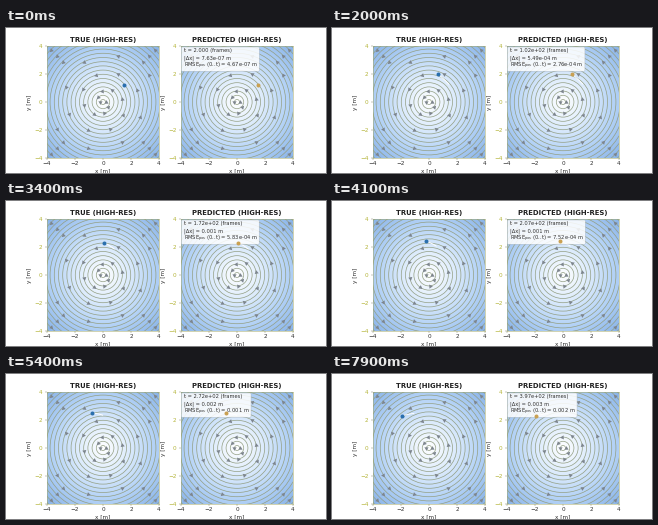
A matplotlib script for the animation above (8 s loop, 320x145 px).

```python
import numpy as np
import matplotlib.pyplot as plt
from matplotlib.animation import FuncAnimation
from matplotlib.colors import LinearSegmentedColormap
from matplotlib.patches import Circle, FancyBboxPatch

WIDTH, HEIGHT, DPI = 320, 145, 100
FRAMES, INTERVAL = 80, 100
PT = 72 / DPI  # points per pixel
PANEL, TOP, GAP = 112, 18, 134
LEFT = 41
RING_STEP = 0.3
GOLDEN_ANGLE = np.pi * (3 - np.sqrt(5))

plt.rcParams["font.family"] = "DejaVu Sans"
plt.rcParams["mathtext.fontset"] = "dejavusans"

fig = plt.figure(figsize=(WIDTH / DPI, HEIGHT / DPI), dpi=DPI, facecolor="white")
speed_map = LinearSegmentedColormap.from_list(
    "speed", ["#ffffff", "#dcebfc", "#b2d1f6", "#8ab4e9"])

axis = np.linspace(-4, 4, 81)
SPEED = np.hypot(*np.meshgrid(axis, axis))

stage = fig.add_axes([0, 0, 1, 1], zorder=5)
stage.set(xlim=(0, WIDTH), ylim=(HEIGHT, 0))
stage.axis("off")


def label(x, y, text, size, **style):
    style = {"ha": "center", "va": "baseline", "color": "#303030", **style}
    return stage.text(x, y, text, fontsize=size * PT, **style)


def arrow_angles(ring, radius):
    """Two opposite arrows on a full ring, one per corner on a cut ring."""
    if radius < 4:
        return ring * GOLDEN_ANGLE + np.pi * np.arange(2)
    if ring % 2:
        return np.pi / 4 + np.pi / 2 * np.arange(4)
    return []


def draw_streamlines(ax):
    for ring, radius in enumerate(np.arange(0.18, 5.6, RING_STEP)):
        ax.add_patch(Circle((0, 0), radius, fill=False, edgecolor="#939f84",
                            linewidth=0.7 * PT))
        for angle in arrow_angles(ring, radius):
            ax.plot(radius * np.cos(angle), radius * np.sin(angle), ms=4.8 * PT,
                    marker=(3, 0, np.degrees(angle)), color="#7d858e", mew=0)


def draw_panel(left, title):
    ax = fig.add_axes([left / WIDTH, 1 - (TOP + PANEL) / HEIGHT,
                       PANEL / WIDTH, PANEL / HEIGHT])
    ax.imshow(SPEED, extent=(-4, 4, -4, 4), origin="lower", cmap=speed_map,
              vmin=0, vmax=5.66, interpolation="bilinear", aspect="auto")
    draw_streamlines(ax)
    ax.set(xlim=(-4, 4), ylim=(-4, 4), xticks=range(-4, 5, 2), yticks=range(-4, 5, 2))
    ax.tick_params(length=1.6 * PT, width=0.4 * PT, color="#77775a",
                   labelbottom=False, labelleft=False)
    for spine in ax.spines.values():
        spine.set(linewidth=0.5 * PT, color="#a3a868")

    middle = left + PANEL / 2
    label(middle, 14.1, title, 6.88, weight="bold", color="#202020")
    label(middle, 143, "x [m]", 5.8, va="center")
    label(left - 17.2, TOP + PANEL / 2, "y [m]", 5.8, rotation=90, va="center")
    for value in range(-4, 5, 2):
        text = str(value).replace("-", "\u2212")
        label(middle + 14 * value, 137.2, text, 5.75)
        label(left - 4.5, 76 - 14 * value, text, 5.75, ha="right", color="#b5b53c")


draw_panel(LEFT, "TRUE (HIGH-RES)")
draw_panel(LEFT + GAP, "PREDICTED (HIGH-RES)")

# Information box
box = FancyBboxPatch((176.2, 19.8), 75, 22.6, boxstyle="round,pad=0.8,rounding_size=1",
                     facecolor=(1, 1, 1, 0.85), edgecolor="#a9b4c0",
                     linewidth=0.4 * PT, zorder=2)
stage.add_patch(box)
lines = [label(177.5, y, "", 5.1, ha="left", zorder=3) for y in (24.3, 31.8, 39.2)]

# Particle drifting outwards along the vortex
KNOTS = [2, 102, 142, 207, 272, 332, 397]
TRAIL = 90
path_x = np.poly1d(np.polyfit(KNOTS, [118, 106, 101, 94, 86, 78.7, 69.7], 3))
path_y = np.poly1d(np.polyfit(KNOTS, [57.6, 45.7, 43.5, 40.7, 39.4, 39.3, 42.3], 3))
trails = [stage.plot([], [], color="white", lw=0.9 * PT, zorder=1)[0] for _ in range(2)]
dots = [stage.plot([], [], "o", ms=4 * PT, mew=0, color=color, zorder=4)[0]
        for color in ("#2a6fae", "#c9a052")]


def power_law(t, times, values):
    return np.exp(np.interp(np.log(t), np.log(times), np.log(values)))


def number(value):
    return f"{value:.3f}" if 1e-3 <= value < 100 else f"{value:.2e}"


def update(frame):
    t = 2 + 5 * frame
    error = power_law(t, [2, 102, 142, 397], [7.63e-7, 5.49e-4, 8.80e-4, 3.35e-3])
    rmse = power_law(t, [2, 102, 142, 207, 397],
                     [4.67e-7, 2.76e-4, 4.48e-4, 7.52e-4, 1.81e-3])
    lines[0].set_text(f"t = {number(t)} (frames)")
    lines[1].set_text(f"|\u0394x| = {number(error)} m")
    lines[2].set_text(r"RMSE$_{\mathrm{pos}}$ (0..t) = " + f"{number(rmse)} m")
    right = max(line.get_window_extent().x1 for line in lines)
    box.set_width(right + 1.2 - box.get_x())
    past = np.linspace(max(2, t - TRAIL), t, 20)
    for dot, trail, shift in zip(dots, trails, (0, GAP)):
        dot.set_data([path_x(t) + shift], [path_y(t)])
        trail.set_data(path_x(past) + shift, path_y(past))
    return [box, *lines, *trails, *dots]


anim = FuncAnimation(fig, update, frames=FRAMES, interval=INTERVAL,
                     repeat=True, repeat_delay=0)
plt.show()
```
